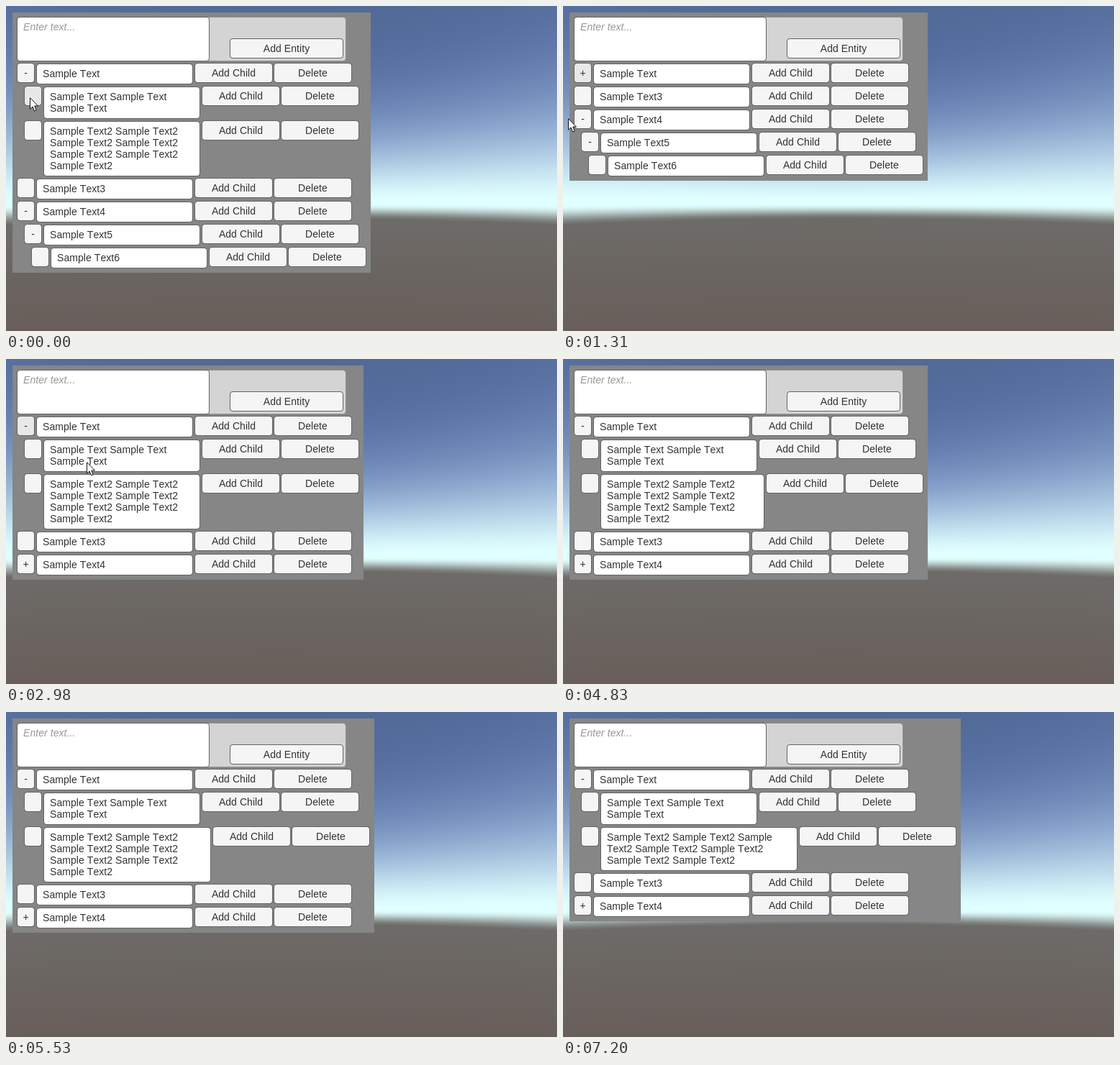
These frames come from a looping animation (766x452 px, 8 s). An HTML page with a canvas:

```html
<!DOCTYPE html>
<html lang="en">
<head>
<meta charset="utf-8">
<title>Entity tree</title>
<style>
  html, body { margin: 0; width: 766px; height: 452px; overflow: hidden; }
  body {
    position: relative;
    font: 14px/16px "Liberation Sans", Arial, sans-serif;
    font-kerning: none;
    letter-spacing: .06px;
    color: #323232;
  }
  #sky, #cursor { position: absolute; left: 0; top: 0; }
  #cursor { top: 1px; }
  #panel {
    position: absolute; left: 9px; top: 9px;
    padding: 6px 6px 4px; background: #858685;
  }
  .head, .entry, .btn, .field {
    box-sizing: border-box; border: 1px solid #646464; border-radius: 4px;
    background-clip: padding-box;
  }
  .head {
    position: relative; width: 458px; height: 62px; margin-bottom: 2px;
    background-color: #d4d4d4; border-color: #909090;
  }
  .entry {
    position: absolute; left: -1px; top: -1px; width: 268px; height: 62px;
    padding: 5px 0 0 8px; background-color: #fff;
    font-style: italic; color: #989898;
  }
  .row { display: flex; align-items: flex-start; margin-bottom: 2px; }
  .btn {
    width: 109px; height: 28px; padding-top: 5px; flex: none;
    text-align: center; white-space: nowrap; background-color: #f5f5f5;
  }
  .head .btn { position: absolute; left: 295px; top: 29px; width: 158px; }
  .row .toggle { width: 25px; }
  .field {
    flex: none; width: 218px; margin: 1px 2px 0; padding: 5px 8px 6px;
    background-color: #fff;
  }
  .del { margin-left: 1px; }
</style>
</head>
<body>
<canvas id="sky" width="766" height="452"></canvas>
<div id="panel">
  <div class="head">
    <div class="entry">Enter text...</div>
    <div class="btn">Add Entity</div>
  </div>
</div>
<svg id="cursor" width="14" height="22" viewBox="0 0 14 22">
  <path d="M.5 .7V16.2L4 12.9L6.6 19L9.2 17.9L6.7 12H11.5Z" fill="#fff" stroke="#111"/>
</svg>
<script>
const LOOP = 8000, STEP = 75, PRESS = 150, BLUR = 4830;
const panel = document.getElementById('panel');
const cursor = document.getElementById('cursor');

const clamp = v => Math.max(0, Math.min(1, v));
const mix = (a, b, f) => a + (b - a) * f;

// Wide-angle sky: haze fades with elevation, then turns to ground at the horizon.
function shade(x, y) {
  const dx = (x - 383) / 383;
  const rise = 293 + 9 * dx * dx - y;
  const up = rise > 0 ? rise / Math.hypot(1, dx) : rise;
  const haze = Math.exp(-((Math.max(0, up - 23) / 88) ** 1.4));
  const s = clamp((18 - up) / 21);
  const ground = s * s * (3 - 2 * s);
  const depth = clamp(-up / 160);
  return [
    mix(mix(80, 224, haze), mix(109, 104, depth), ground),
    mix(mix(104, 255, haze), mix(107, 94, depth), ground),
    mix(mix(146, 255, haze ** .7), mix(104, 89, depth), ground)
  ];
}

function paintSky() {
  const ctx = document.getElementById('sky').getContext('2d');
  const img = ctx.createImageData(766, 452);
  for (let i = 0; i < 766 * 452; i++) {
    img.data.set([...shade(i % 766, Math.floor(i / 766)), 255], i * 4);
  }
  ctx.putImageData(img, 0, 0);
}

function add(parent, cls, text = '') {
  const el = document.createElement('div');
  el.className = cls;
  el.textContent = text;
  return parent.appendChild(el);
}

function makeRow([text, depth, parent]) {
  const el = add(panel, 'row');
  el.style.marginLeft = depth * 10 + 'px';
  const toggle = add(el, 'btn toggle');
  const field = add(el, 'field', text);
  add(el, 'btn', 'Add Child');
  add(el, 'btn del', 'Delete');
  return { el, toggle, field, parent };
}

const repeat = (text, n) => Array(n).fill(text).join(' ');
// text, depth, parent row
const rows = [
  ['Sample Text', 0],
  [repeat('Sample Text', 3), 1, 0],
  [repeat('Sample Text2', 7), 1, 0],
  ['Sample Text3', 0],
  ['Sample Text4', 0],
  ['Sample Text5', 1, 4],
  ['Sample Text6', 2, 5]
].map(makeRow);

// Each click folds or unfolds a row on release.
const clicks = [{ at: 605, row: 0 }, { at: 1595, row: 4 }, { at: 2370, row: 0 }];

// start, end, target values
const moves = [
  [60, 450, 21, 96],
  [1070, 1295, 7, 155], [1370, 1445, 17, 155],
  [1920, 2070, 20, 98],
  [2680, 2905, 112, 142], [3070, 3460, 231, 147], [3520, 3680, 302, 125],
  [6990, 6990, 514, 37], [7060, 7130, 511, 8]
];
const widths = [
  [4830, 4830, 10], [4904, 5200, 111],
  [5350, 5530, 15], [5590, 5680, 0],
  [5890, 6040, 56]
];

// Follow the tracks in even ticks, the first tick falling on each start.
function follow(from, tracks, t) {
  let pos = from;
  for (const [t0, t1, ...to] of tracks) {
    if (t < t0) break;
    const ticks = Math.round((t1 - t0) / STEP) + 1;
    const p = clamp((Math.floor((t - t0) / STEP) + 1) / ticks);
    pos = pos.map((v, i) => mix(v, to[i], p));
  }
  return pos.map(Math.round);
}

const isOpen = (i, t) => clicks.filter(c => c.row === i && c.at <= t).length % 2 === 0;
const isShown = (i, t) => {
  const { parent } = rows[i];
  return parent === undefined || isOpen(parent, t) && isShown(parent, t);
};

function isOver(el, x, y) {
  const r = el.getBoundingClientRect();
  return x >= r.left && x < r.right && y >= r.top && y < r.bottom;
}

function draw(t) {
  rows.forEach(({ el, toggle }, i) => {
    el.style.display = isShown(i, t) ? '' : 'none';
    const isParent = rows.some(r => r.parent === i);
    toggle.textContent = !isParent ? '' : isOpen(i, t) ? '-' : '+';
  });
  rows[2].field.style.width = 218 + follow([0], widths, t)[0] + 'px';

  const [x, y] = follow([33, 126], moves, t);
  const away = t >= 3760 && t < 6990 || t >= 7200;
  cursor.style.visibility = away ? 'hidden' : '';
  cursor.style.transform = `translate(${x}px, ${y}px)`;

  const last = clicks.filter(c => t >= c.at - PRESS).pop();
  rows.forEach(({ toggle }, i) => {
    const focused = last && last.row === i && t < BLUR;
    const pressed = focused && t < last.at;
    const lit = focused || isOver(toggle, x, y);
    toggle.style.backgroundColor = pressed ? '#bfbfbf' : lit ? '#e8e8e8' : '';
  });
}

paintSky();
const start = performance.now();
function tick() {
  draw((performance.now() - start) % LOOP);
  requestAnimationFrame(tick);
}
tick();
</script>
</body>
</html>
```
